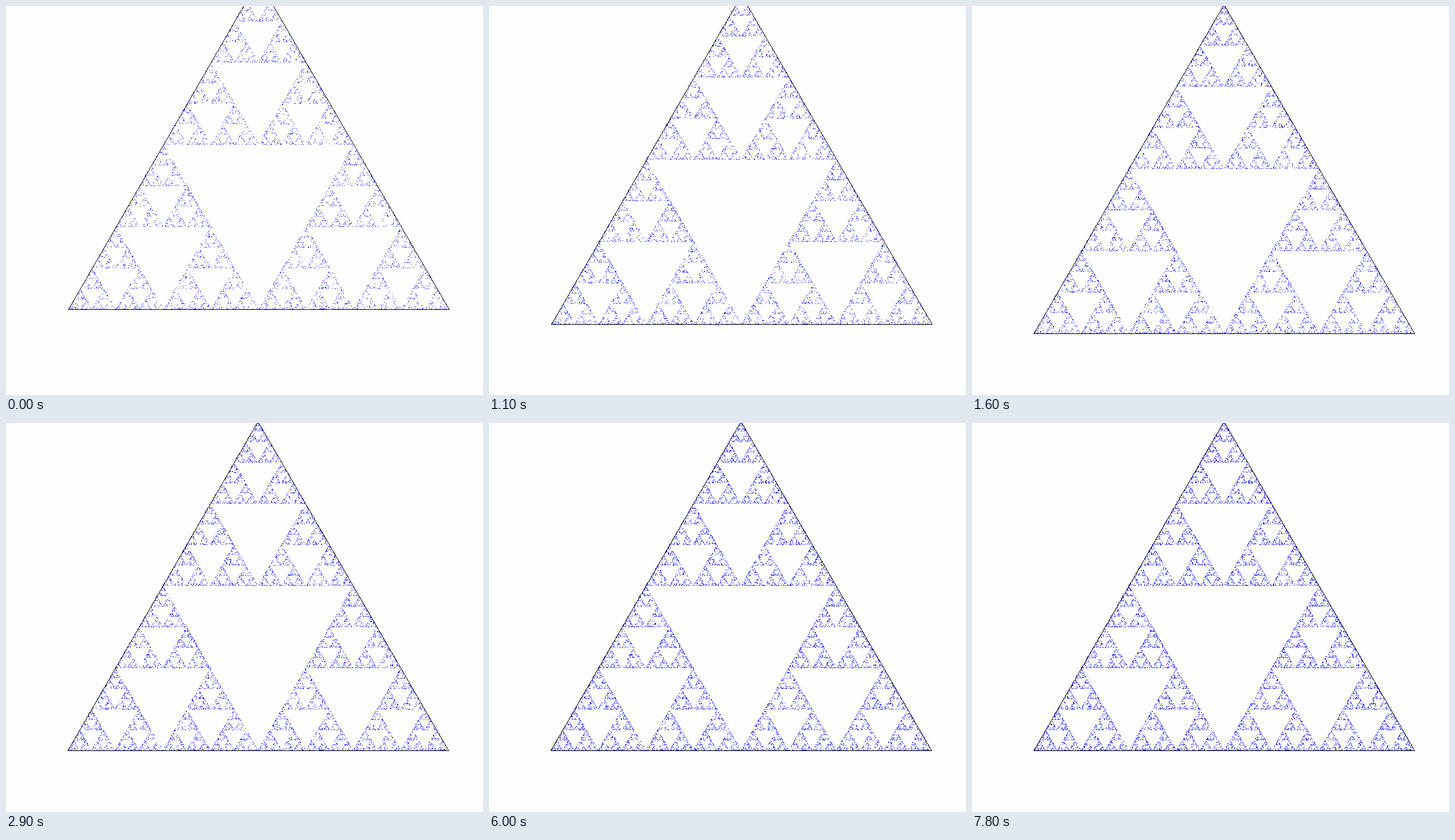
An HTML page with a canvas that plays this animation: 828 px wide and 676 px high, repeating every 8 s.

```html
<!DOCTYPE html>
<html lang="en">
<head>
<meta charset="utf-8">
<title>Chaos game</title>
<style>
  html, body { margin: 0; width: 100%; height: 100%; overflow: hidden; background: #fefefe; }
  canvas { display: block; }
</style>
</head>
<body>
<canvas id="stage" width="828" height="676"></canvas>
<script>
const LOOP = 8000;
const WIDTH = 661, HEIGHT = 572, APEX = 330;
const START_COUNT = 6000, BATCH = 600;
const repaints = [0, 800, 1000, 1100, 1200, 1600, 2200, 2900, 3600, 4400, 5200, 6000, 6900, 7800];

// Left and top edge of the triangle as the view scrolls
const views = [
  { at: 0, x: 108, y: -45 },
  { at: 1100, x: 108, y: -19 },
  { at: 1200, x: 107, y: 7, border: true },
  { at: 1600, x: 107, y: -3 }
];

const ctx = document.getElementById('stage').getContext('2d', { alpha: false });
const corners = [[APEX, 0], [0, HEIGHT], [WIDTH, HEIGHT]];
const points = playChaos(START_COUNT + BATCH * (repaints.length - 1));
let shown = -1;

function seeded(seed) {
  return () => {
    seed = (seed + 0x6D2B79F5) | 0;
    let n = Math.imul(seed ^ (seed >>> 15), 1 | seed);
    n = (n + Math.imul(n ^ (n >>> 7), 61 | n)) ^ n;
    return ((n ^ (n >>> 14)) >>> 0) / 4294967296;
  };
}

function playChaos(total) {
  const random = seeded(27);
  const list = [];
  let x = APEX, y = HEIGHT / 2;
  for (let i = -12; i < total; i++) {
    const [cx, cy] = corners[Math.floor(random() * 3)];
    x = (x + cx) / 2;
    y = (y + cy) / 2;
    if (i >= 0) list.push([Math.floor(x), Math.floor(y)]);
  }
  return list;
}

function rect(color, x, y, w = 1, h = 1) {
  ctx.fillStyle = color;
  ctx.fillRect(x, y, w, h);
}

// One pixel per row keeps the sides crisp
function drawOutline(left, top) {
  for (let row = 0; row <= HEIGHT; row++) {
    const t = row / HEIGHT;
    rect('#000', left + Math.round(APEX * (1 - t)), top + row);
    rect('#000', left + Math.round(APEX + (WIDTH - APEX) * t), top + row);
  }
  rect('#000', left, top + HEIGHT, WIDTH + 1);
}

function drawBorder() {
  rect('#e3e3e3', 0, 3, 828);
  rect('#808080', 0, 6, 828);
  rect('#101010', 0, 7, 828);
}

function draw(step) {
  const time = repaints[step];
  const view = views.filter(v => v.at <= time).pop();
  const count = START_COUNT + BATCH * step;
  rect('#fefefe', 0, 0, 828, 676);
  for (let i = 0; i < count; i++) {
    rect('#00f', view.x + points[i][0], view.y + points[i][1]);
  }
  drawOutline(view.x, view.y);
  if (view.border) drawBorder();
}

function update(now) {
  const time = now % LOOP;
  const step = repaints.filter(t => t <= time).length - 1;
  if (step !== shown) {
    draw(step);
    shown = step;
  }
}

const start = performance.now();
function tick() {
  update(performance.now() - start);
  requestAnimationFrame(tick);
}
tick();
</script>
</body>
</html>
```
